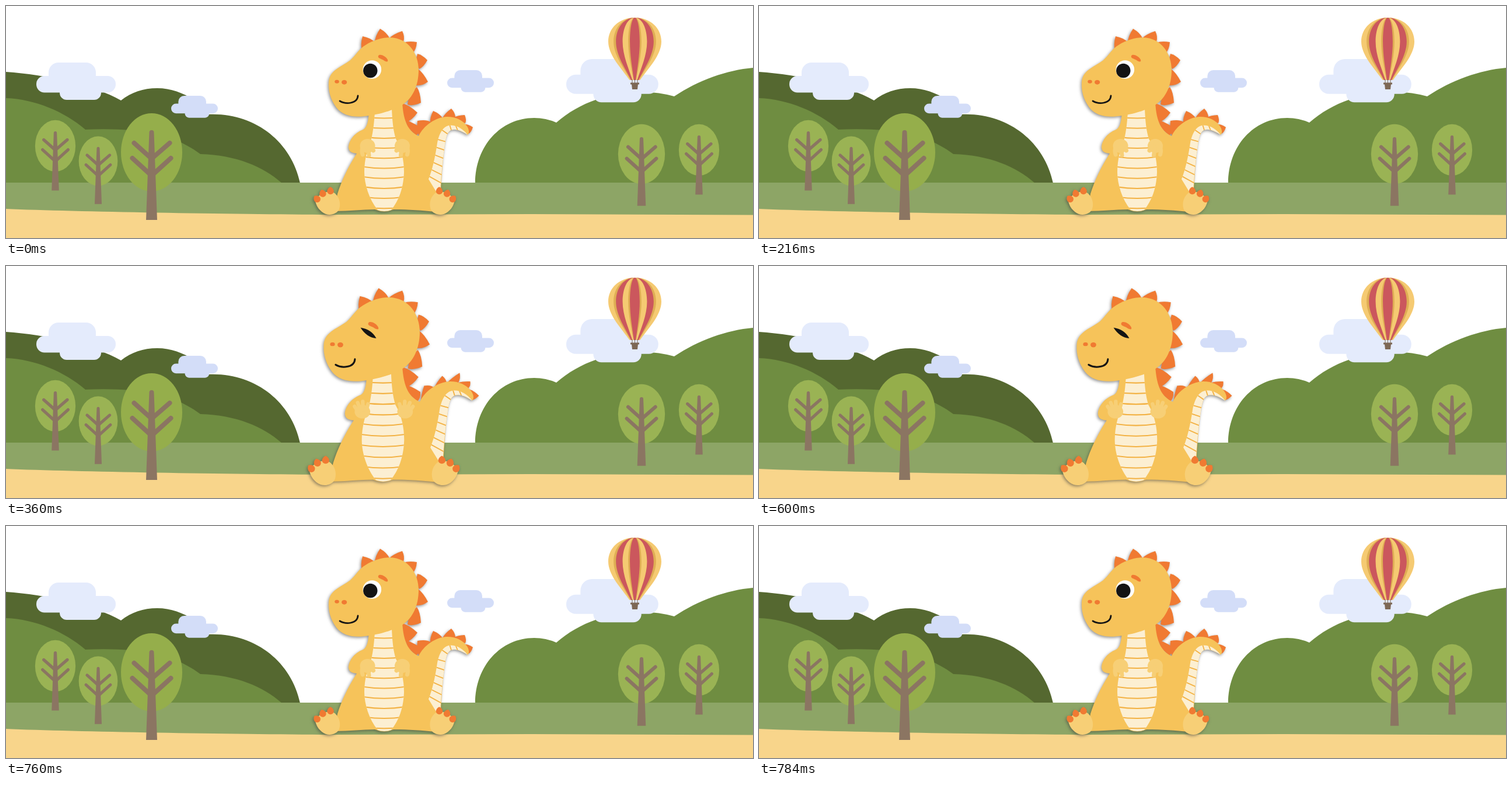
Recreate the animation shown at these times as an HTML page with a canvas. Size 1280 by 398 pixels, loop 800 ms.

```html
<!DOCTYPE html>
<html lang="en">
<head>
<meta charset="utf-8">
<title>Blinking dinosaur</title>
<style>
html, body { margin: 0; width: 100%; height: 100%; overflow: hidden; background: #fff; }
canvas { display: block; width: 1280px; height: 398px; }
</style>
</head>
<body>
<canvas id="stage" width="1280" height="398"></canvas>
<script>
const W = 1280, H = 398, LOOP = 800, CLOSE_AT = 360, OPEN_AT = 760;
const stage = document.getElementById('stage').getContext('2d');
const SKIN = '#f6c35a', LIMB = '#f7cf76', ORANGE = '#f07a32', CREAM = '#fcefd2', BAND = '#f3b244', INK = '#141414';

function layer() {
  const c = document.createElement('canvas');
  c.width = W;
  c.height = H;
  return c.getContext('2d');
}

function fill(g, color, d) {
  g.fillStyle = color;
  g.fill(new Path2D(d));
}

function oval(g, color, x, y, rx, ry = rx, turn = 0) {
  g.fillStyle = color;
  g.beginPath();
  g.ellipse(x, y, rx, ry, turn, 0, Math.PI * 2);
  g.fill();
}

function line(g, color, width, d) {
  g.strokeStyle = color;
  g.lineWidth = width;
  g.stroke(new Path2D(d));
}

function placed(g, x, y, sx, sy, draw) {
  g.save();
  g.translate(x, y);
  g.scale(sx, sy);
  draw(g);
  g.restore();
}

// Scenery

function cloud(g, color, x, y, s) {
  placed(g, x, y, s, s, () => {
    g.fillStyle = color;
    g.beginPath();
    g.roundRect(21, 0, 81, 42, 17);
    g.roundRect(0, 23, 136, 28.5, 14);
    g.roundRect(40, 38, 71, 26, 12);
    g.fill();
  });
}

function tree(g, color, x, y, s) {
  placed(g, x, y, s, s, () => {
    oval(g, color, 0, 0, 52.5, 67);
    g.lineCap = 'round';
    line(g, '#8b7562', 8, 'M-30 -16 L0 11 L31 -16 M-33 10 L0 40 L33 10');
    fill(g, '#8b7562', 'M-4 -34 A4 4 0 0 1 4 -34 L9.5 116 L-9.5 116 Z');
  });
}

function balloon(g) {
  const gores = [['#f5ca72', 1], ['#dfae54', .8], ['#cb575d', .71], ['#f5ca72', .46], ['#dfae54', .25], ['#cb575d', .185]];
  for (const [color, s] of gores) {
    placed(g, 1077.5, 20, s, 1, () =>
      fill(g, color, 'M0 0 C27 0 45.5 18 45.5 41 C45.5 65 22 88 9 107 L-9 107 C-22 88 -45.5 65 -45.5 41 C-45.5 18 -27 0 0 0 Z'));
  }
  line(g, '#7d6855', 1, 'M1073 126 V133 M1077.5 126 V133 M1082 126 V133');
  fill(g, '#7d6855', 'M1070 131.5 H1085 V134.5 H1070 Z M1072 134 H1083 L1082 143 H1073 Z');
}

function scenery(g) {
  g.fillStyle = '#fff';
  g.fillRect(0, 0, W, H);
  fill(g, '#556830', 'M0 113 C70 118 150 135 197 162 C215 148 235 141 259 141 C283 141 303 149 322 161 L346 186 C425 182 489 232 504 304 H0 Z');
  fill(g, '#6f8d41', 'M0 158 C50 160 100 181 136 212 Q175 210 215 213 C265 217 304 232 333 254 C395 256 440 275 473 304 H0 Z');
  fill(g, '#6f8d41', 'M804 304 C804 240 848 192 905 192 Q925 192 943 200 C983 165 1037 147 1090 147 Q1120 148 1145 155 C1187 127 1235 110 1280 106 V304 Z');
  fill(g, '#8da566', 'M0 303 H1280 V398 H0 Z');
  fill(g, '#f8d58b', 'M0 348 C120 353 380 357 560 358 L900 357 L1280 358.5 V398 H0 Z');

  cloud(g, '#e4ebfc', 52, 97, 1);
  cloud(g, '#d3ddf8', 283, 154, .588);
  cloud(g, '#d3ddf8', 756, 110, .588);
  cloud(g, '#e4ebfc', 960, 91, 1.16);

  tree(g, '#9ab354', 84.5, 240, .66);
  tree(g, '#9ab354', 158, 266, .635);
  tree(g, '#95ae4b', 249.5, 251, 1);
  tree(g, '#9ab354', 1089, 254, .765);
  tree(g, '#9ab354', 1187.5, 247, .66);
  balloon(g);
}

// Dinosaur

// Each spike: base start, tip, base end.
const BACK_SPIKES = [
  [610, 76, 611, 52, 632, 62], [632, 62, 641, 39, 657, 55], [657, 55, 679, 43, 681, 61],
  [681, 63, 704, 62, 697, 81], [705, 82, 722, 93, 708, 108], [706, 108, 723, 130, 703, 136],
  [704, 139, 711, 166, 688, 169], [679, 167, 705, 183, 684, 200], [684, 196, 708, 207, 703, 222]
];
const TAIL_AWAKE = [
  [708, 223, 705, 197, 728, 199], [727, 200, 732, 180, 748, 192], [748, 192, 763, 176, 770, 191],
  [768, 191, 786, 187, 787, 201], [787, 203, 800, 208, 793, 219]
];
const TAIL_ASLEEP = [
  [709, 225, 714, 197, 731, 201], [730, 201, 743, 181, 750, 193], [750, 193, 771, 176, 769, 192],
  [769, 192, 788, 190, 785, 201], [787, 203, 802, 213, 790, 220]
];

function spike(g, [ax, ay, tx, ty, bx, by]) {
  const mx = (ax + bx) / 2, my = (ay + by) / 2, bulge = .32;
  const ctrl = (x, y) => [(x + tx) / 2 + (x - mx) * bulge, (y + ty) / 2 + (y - my) * bulge];
  g.fillStyle = ORANGE;
  g.beginPath();
  g.moveTo(ax, ay);
  g.quadraticCurveTo(...ctrl(ax, ay), tx, ty);
  g.quadraticCurveTo(...ctrl(bx, by), bx, by);
  g.lineTo(mx - (tx - mx) * .3, my - (ty - my) * .3);
  g.fill();
}

// Draws a left part and its twin on the other side of the belly.
function pair(g, draw) {
  draw(g);
  placed(g, 1298.5, 0, -1, 1, draw);
}

function banded(g, shape, bands, width) {
  const path = new Path2D(shape);
  g.save();
  g.fillStyle = CREAM;
  g.fill(path);
  g.clip(path);
  line(g, BAND, width, bands);
  g.restore();
}

function toe(g, x, y, turn) {
  g.save();
  g.translate(x, y);
  g.rotate(turn);
  fill(g, ORANGE, 'M-5.8 1 A5.8 5.8 0 0 0 5.8 1 Q5 -4 0 -6.3 Q-5 -4 -5.8 1 Z');
  g.restore();
}

function foot(g) {
  fill(g, LIMB, 'M530 334 C536 322 548 317 560 319 C571 325 574 338 571 348 C568 356 557 360 548 357 C538 353 531 343 530 334 Z');
  toe(g, 532.5, 330.5, -.7);
  toe(g, 542.5, 321, -.3);
  toe(g, 556, 316.5, 0);
}

function droopingHand(g) {
  oval(g, LIMB, 619.5, 240, 13, 12);
  line(g, LIMB, 7, 'M611 242 Q609 249 611 255 M620 243 L622 256');
  line(g, LIMB, 7, 'M626 240 L629.5 248');
}

function raisedHand(g) {
  oval(g, LIMB, 615, 239, 12.5, 11);
  line(g, LIMB, 6, 'M609 240 L602.5 230.5 M612 236 L607.5 224.5 M616 236 L615.5 222.5 M621 237 L624 226.5');
}

function awakeFace(g) {
  oval(g, '#fff', 627.3, 109, 15.8);
  oval(g, INK, 624.3, 111, 12.2);
  brow(g, 646, 89.3);
}

function asleepFace(g) {
  fill(g, INK, 'M612 103 Q630 106 637.3 120.3 Q622 119 612 103 Z');
  brow(g, 632.5, 99.5);
}

function brow(g, x, y) {
  placed(g, x, y, 1, 1, () =>
    fill(g, ORANGE, 'M-8 -4 C-6 -8 4 -4 7.5 2 C10 7 6 7 2 4.5 C-2 1 -10 1 -8 -4 Z'));
}

function dino(g, asleep) {
  g.lineCap = 'round';
  BACK_SPIKES.forEach(s => spike(g, s));
  (asleep ? TAIL_ASLEEP : TAIL_AWAKE).forEach(s => spike(g, s));

  fill(g, SKIN, 'M622 180 C621 198 619 208 612 212 C596 218 587 232 587 243 C588 250 592 252 601 253 ' +
    'C585 278 575 300 568 322 L562 352 C590 352 610 349 632 349 Q648 356 664 349 C690 349 715 351 735 353 ' +
    'L745 318 C747 280 750 250 753 232 C756 216 760 211 770 212 C778 213 785 217 791 221 ' +
    'C799 214 785 190 756 190 C735 191 716 205 707 223 C690 215 681 200 679 165 Z');

  let tailBands = 'M759 200 L764 216 M769 201 L775 216 M746 212 L759 221';
  for (let i = 0; i < 6; i++) {
    const y = 226 + 14.3 * i;
    tailBands += `M722 ${y - 2 - i} L758 ${y + 8 + i}`;
  }
  banded(g, 'M791 221 C783 210 770 203 759 205 C748 207 742 220 739 235 C735 262 730 282 724 297 L738 320 L744 320 ' +
    'C746 285 750 250 753 232 C756 216 760 211 770 212 C778 213 785 217 791 221 Z', tailBands, 1.8);

  let bellyBands = '';
  for (let i = 0; i < 10; i++) {
    const y = 191 + 17.2 * i;
    bellyBands += `M608 ${y - 2} Q648 ${y + 5} 688 ${y - 2}`;
  }
  banded(g, 'M632 180 L661 176 C662 200 664 215 668 228 C678 245 682 265 682 285 C681 315 672 335 660 350 ' +
    'Q648 354 637 350 C622 332 614 305 614 285 C614 262 620 245 626 228 C629 215 631 200 632 180 Z', bellyBands, 2);

  pair(g, foot);
  pair(g, asleep ? raisedHand : droopingHand);

  fill(g, SKIN, 'M622 188 C600 192 578 190 566 174 C556 160 552 146 553 130 C555 110 572 106 590 93 ' +
    'C600 84 604 74 616 67 C630 58 645 54 658 54 C690 55 707 82 707 110 C707 136 697 158 680 169 ' +
    'C668 177 645 185 622 188 Z');
  oval(g, ORANGE, 567, 129.8, 3.8, 3);
  oval(g, ORANGE, 579.6, 130.8, 4.6, 3.9);
  line(g, INK, 2.8, 'M572 163 C582 169 602 168 603 154');
  (asleep ? asleepFace : awakeFace)(g);
}

function pose(asleep) {
  const figure = layer(), scene = layer();
  // The sleeping figure is slightly larger.
  if (asleep) figure.setTransform(1.068, 0, 0, 1.06, -46.1, -3.4);
  dino(figure, asleep);
  scenery(scene);
  scene.shadowColor = 'rgba(60, 60, 60, .55)';
  scene.shadowOffsetX = -1.5;
  scene.shadowOffsetY = 2;
  scene.shadowBlur = 5;
  scene.drawImage(figure.canvas, 0, 0);
  return scene.canvas;
}

const awake = pose(false), asleep = pose(true);

function frame() {
  const t = performance.now() % LOOP;
  stage.drawImage(t >= CLOSE_AT && t < OPEN_AT ? asleep : awake, 0, 0);
  requestAnimationFrame(frame);
}
frame();
</script>
</body>
</html>
```
